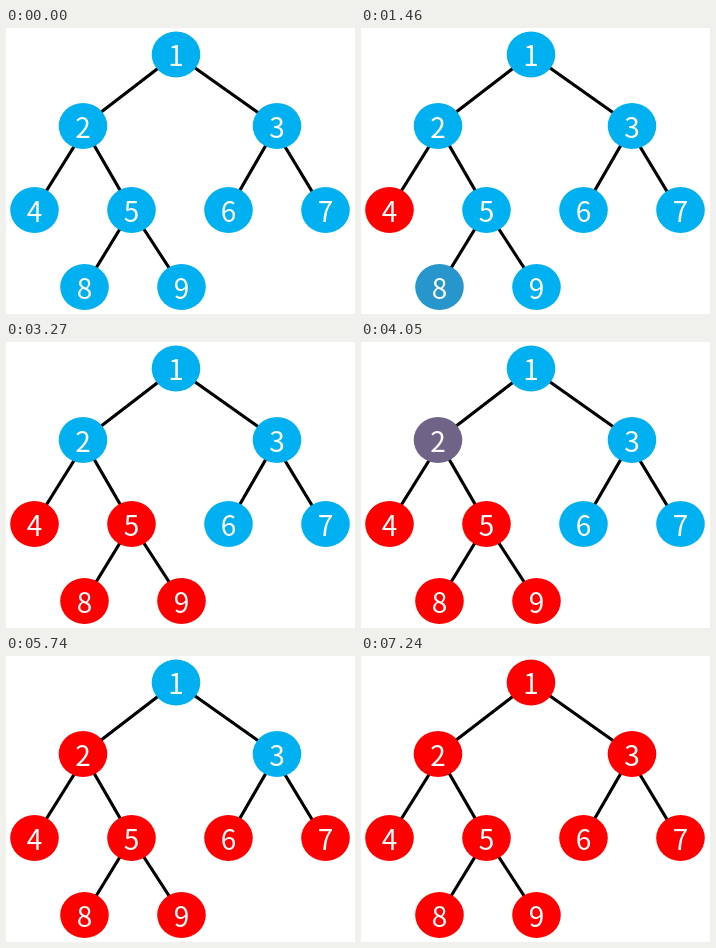
An HTML page with a canvas for the animation above (8.39 s loop, 349x286 px).

```html
<!DOCTYPE html>
<html lang="en">
<head>
<meta charset="utf-8">
<title>Post-order tree traversal</title>
<style>
html, body { margin: 0; width: 100%; height: 100%; overflow: hidden; background: #fff; }
canvas { display: block; width: 349px; height: 286px; }
</style>
</head>
<body>
<canvas id="stage" width="349" height="286"></canvas>
<script>
const ctx = document.getElementById('stage').getContext('2d');
const LOOP = 8390;
const RX = 24.3, RY = 23;
const BLUE = [0, 176, 240], RED = [255, 0, 0];

// Each node fades in discrete steps from start to end.
// peak: level of the last step, settled: when it becomes fully red.
const nodes = [
  { label: '1', x: 170, y: 26.5, start: 7010, end: 7240, steps: 4 },
  { label: '2', x: 77, y: 98, start: 3900, end: 4130, steps: 4 },
  { label: '3', x: 271, y: 98, start: 6220, end: 6460, steps: 4 },
  { label: '4', x: 28.5, y: 182, start: 710, end: 1010, steps: 5 },
  { label: '5', x: 125.5, y: 182, start: 3040, end: 3270, steps: 4 },
  { label: '6', x: 222.5, y: 182, start: 4670, end: 4810, steps: 3, peak: 0.98, settled: 5440 },
  { label: '7', x: 319.5, y: 182, start: 5440, end: 5740, steps: 5 },
  { label: '8', x: 78.5, y: 259, start: 1460, end: 1720, steps: 4, hold: 100 },
  { label: '9', x: 175.5, y: 259, start: 2240, end: 2430, steps: 3, peak: 0.93, settled: 3040 }
];

const edges = [
  [170, 26.5, 77, 98], [170, 26.5, 271, 98],
  [69, 117, 39, 165], [77, 98, 125.5, 182],
  [271, 98, 222.5, 182], [278, 117, 307, 165],
  [125.5, 182, 78.5, 259], [125.5, 182, 175.5, 259]
];

function level(node, t) {
  const { start, end, steps, peak = 1, settled = end, hold } = node;
  if (t < start) return 0;
  if (t >= end) return t >= settled && settled > end ? 1 : peak;
  const first = hold || (end - start) / (steps - 1);
  const gap = (end - start - first) / (steps - 2);
  const past = t - start;
  const step = past < first ? 0 : 1 + Math.floor((past - first) / gap);
  const low = steps === 3 ? 0.3 : 0.15;
  return low + (peak - low) * step / (steps - 1);
}

function mix(k) {
  return `rgb(${BLUE.map((c, i) => Math.round(c + (RED[i] - c) * k)).join(',')})`;
}

function drawEdges() {
  ctx.strokeStyle = '#000';
  ctx.lineWidth = 3.2;
  ctx.beginPath();
  for (const [x1, y1, x2, y2] of edges) {
    ctx.moveTo(x1, y1);
    ctx.lineTo(x2, y2);
  }
  ctx.stroke();
}

function drawNode(node, t) {
  ctx.fillStyle = mix(level(node, t));
  ctx.beginPath();
  ctx.ellipse(node.x, node.y, RX, RY, 0, 0, Math.PI * 2);
  ctx.fill();
  ctx.fillStyle = '#fff';
  ctx.fillText(node.label, node.x, node.y + 11.5);
}

function draw(t) {
  ctx.fillStyle = '#fff';
  ctx.fillRect(0, 0, 349, 286);
  drawEdges();
  ctx.font = '300 28px "Noto Sans CJK SC", "Noto Sans CJK JP", "Noto Sans CJK", "Noto Sans", sans-serif';
  ctx.textAlign = 'center';
  ctx.textBaseline = 'alphabetic';
  for (const node of nodes) drawNode(node, t);
}

const origin = performance.now();
function tick() {
  draw((performance.now() - origin) % LOOP);
  requestAnimationFrame(tick);
}
tick();
</script>
</body>
</html>
```
